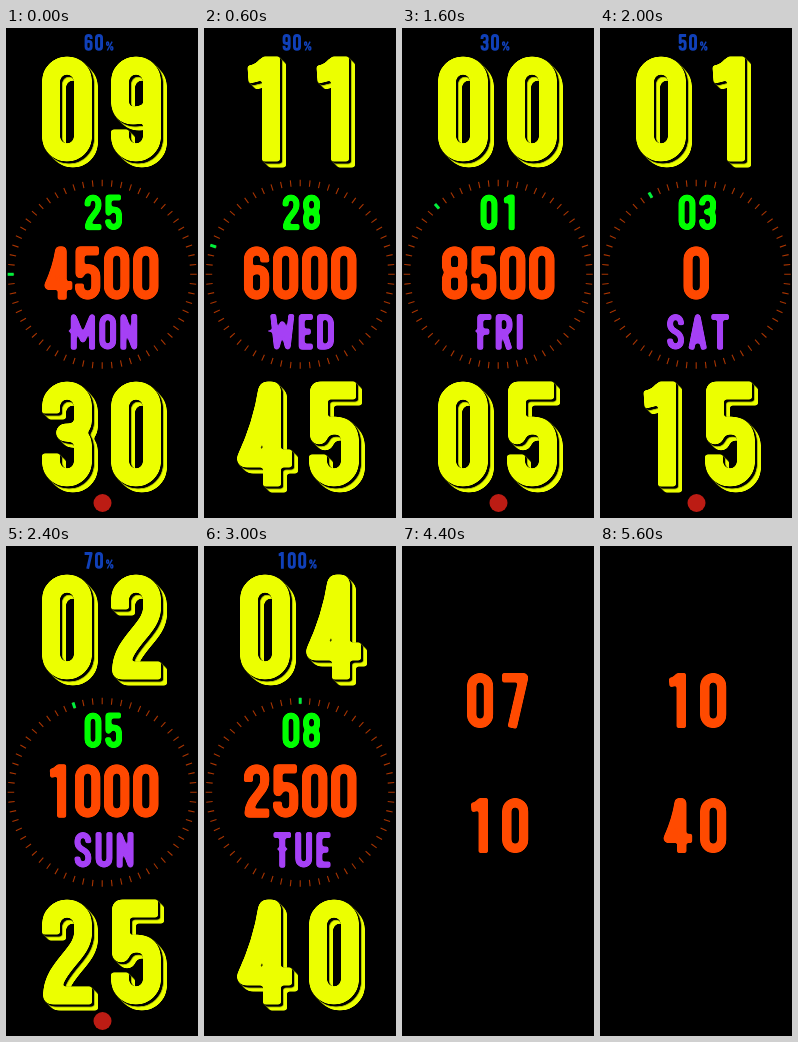
Write an HTML page that moves like this. It is 192 px wide and 490 px high and loops after 5800 ms.

```html
<!DOCTYPE html>
<html lang="en">
<head>
<meta charset="utf-8">
<title>Watch face</title>
<style>
  html, body { margin: 0; width: 100%; height: 100%; overflow: hidden; background: #000; }
  svg { display: block; width: 100vw; height: 100vh; }
</style>
</head>
<body>
<svg viewBox="0 0 192 490" role="img" fill="none" stroke-linejoin="round">
  <defs>
    <filter id="soften" filterUnits="userSpaceOnUse" x="0" y="0" width="192" height="490" color-interpolation-filters="sRGB">
      <feGaussianBlur stdDeviation="1.5"/>
      <feComponentTransfer><feFuncA type="linear" slope="6" intercept="-2.5"/></feComponentTransfer>
    </filter>
    <filter id="softenSmall" filterUnits="userSpaceOnUse" x="0" y="0" width="192" height="490" color-interpolation-filters="sRGB">
      <feGaussianBlur stdDeviation="0.8"/>
      <feComponentTransfer><feFuncA type="linear" slope="4" intercept="-1.5"/></feComponentTransfer>
    </filter>
    <g id="time" stroke="currentColor" filter="url(#soften)"><g id="hour"></g><g id="minute"></g></g>
  </defs>
  <rect width="192" height="490" fill="#000"/>
  <g id="active">
    <g id="ring" stroke="#a83400" stroke-width="1.1"></g>
    <path id="second" stroke="#00f03c" stroke-width="3"/>
    <g id="extrusion"></g>
    <g id="battery" stroke="#1040b8"></g>
    <g id="day" stroke="#00ff00" filter="url(#softenSmall)"></g>
    <g id="steps" stroke="#ff4800" filter="url(#softenSmall)"></g>
    <g id="weekday" stroke="#a540f5" filter="url(#softenSmall)"></g>
    <circle id="link" cx="96.5" cy="475" r="9" fill="#bc1c14"/>
  </g>
  <g id="idle" stroke="#ff4a00" filter="url(#softenSmall)"><g id="idleHour"></g><g id="idleMinute"></g></g>
</svg>
<script>
const STEP = 200, STEPS = 29, IDLE_FROM = 22;
const CENTER = { x: 96.2, y: 246.3 };
const DAYS = ['SUN', 'MON', 'TUE', 'WED', 'THU', 'FRI', 'SAT'];

// Centre lines of 105-unit tall letters, drawn with an 18-unit pen.
const GLYPHS = {
  0: 'M9 25a16 16 0 0 1 32 0V80a16 16 0 0 1-32 0Z',
  1: 'M31 105V0M8 18Q22 17 28 6',
  2: 'M9 35V25a16 16 0 0 1 32 0V34C41 54 10 68 10 96H50',
  3: 'M9 32V25a16 16 0 0 1 32 0V38Q41 51 23 51Q41 51 41 65V80a16 16 0 0 1-32 0V72',
  4: 'M32 105V9H27Q22 42 6 77H52',
  5: 'M47 9H10V54Q14 44 25 44Q41 44 41 60V80a16 16 0 0 1-32 0V73',
  6: 'M41 32V25a16 16 0 0 0-32 0V80a16 16 0 0 0 32 0V61Q41 46 27 46Q18 46 9 52',
  7: 'M0 9H41L19 105',
  8: 'M9 25a16 16 0 0 1 32 0V37a15 15 0 0 1-32 0ZM9 66a15 15 0 0 1 32 0V80a16 16 0 0 1-32 0Z',
  9: 'M9 73V80a16 16 0 0 0 32 0V25a16 16 0 0 0-32 0V44Q9 59 23 59Q32 59 41 53',
  A: 'M9 105L28 9L47 105M15 78H41',
  D: 'M9 9H25a16 16 0 0 1 16 16V80a16 16 0 0 1-16 16H9Z',
  E: 'M42 9H9V96H42M9 52H36',
  F: 'M42 9H9V105M9 52H36',
  H: 'M9 0V105M41 0V105M9 52H41',
  I: 'M9 0V105',
  M: 'M9 105V9L36 75L63 9V105',
  N: 'M9 105V9L41 96V0',
  R: 'M9 105V9H25a16 16 0 0 1 16 16V38a16 16 0 0 1-16 16H9M25 54L41 105',
  S: 'M41 33V25a16 16 0 0 0-32 0V32Q9 44 25 52T41 74V80a16 16 0 0 1-32 0V72',
  T: 'M0 9H52M26 9V105',
  U: 'M9 0V80a16 16 0 0 0 32 0V0',
  W: 'M9 0L20 96L36 30L52 96L63 0'
};
GLYPHS.O = GLYPHS[0];
const WIDTHS = { A: 56, E: 42, F: 42, I: 18, M: 72, T: 52, W: 72 };
const widthOf = c => WIDTHS[c] || 50;

const $ = id => document.getElementById(id);
const pad = n => String(n).padStart(2, '0');

function lineWidth(text, gap) {
  return [...text].reduce((sum, c) => sum + widthOf(c) + gap, -gap);
}

function write(id, text, x, y, scale, gap, extra = '') {
  let pen = 0, marks = '';
  for (const c of text) {
    marks += `<path transform="translate(${pen})" d="${GLYPHS[c]}"/>`;
    pen += widthOf(c) + gap;
  }
  $(id).innerHTML =
    `<g transform="translate(${x} ${y}) scale(${scale})" stroke-width="18">${marks}${extra}</g>`;
}

function writeCentered(id, text, cx, y, scale, gap, extra) {
  write(id, text, cx - lineWidth(text, gap) * scale / 2, y, scale, gap, extra);
}

function radial(angle, inner, outer) {
  const a = angle * Math.PI / 180;
  const at = r => `${CENTER.x + r * Math.sin(a)} ${CENTER.y - r * Math.cos(a)}`;
  return `M${at(inner)}L${at(outer)}`;
}

function buildStatic() {
  let ticks = '';
  for (let i = 0; i < 60; i++) ticks += radial(i * 6, 88, 94.5);
  $('ring').innerHTML = `<path d="${ticks}"/>`;

  const copies = (color, reach) => {
    let out = '';
    for (let d = reach; d > 0; d -= 0.8)
      out += `<use href="#time" x="${d}" y="${d}" color="${color}"/>`;
    return out;
  };
  $('extrusion').innerHTML = copies('#ecff00', 6) + copies('#000', 2.2) +
    '<use href="#time" color="#ecff00"/>';
}

function writeBattery(percent) {
  const text = String(percent), scale = 0.16, gap = 15;
  const x = 93.5 - (text.length * 10.4 + 9) / 2;
  const sign = `<path transform="translate(${text.length * 65 + 2} 46)" stroke-width="9"
    d="M6 10a6 6 0 0 1 12 0V18a6 6 0 0 1-12 0ZM32 40a6 6 0 0 1 12 0V48a6 6 0 0 1-12 0ZM40 2L10 57"/>`;
  write('battery', text, x, 6, scale, gap, sign);
}

function draw(k) {
  const hour = pad(Math.floor(9.5 + k / 2) % 13);
  const minute = pad((6 + k) % 13 * 5);
  const idle = k >= IDLE_FROM;
  $('active').setAttribute('display', idle ? 'none' : 'inline');
  $('idle').setAttribute('display', idle ? 'inline' : 'none');
  document.querySelector('svg').setAttribute('aria-label', `${hour}:${minute}`);

  if (idle) {
    write('idleHour', hour, 65, 127, 0.524, 17);
    write('idleMinute', minute, 65, 252, 0.524, 17);
    return;
  }
  write('hour', hour, 36, 28.5, 1, 19);
  write('minute', minute, 36, 353.5, 1, 19);
  writeBattery((6 + k) % 11 * 10);
  write('day', pad((25 + k) % 32), 78.5, 166.5, 0.34, 10.5);
  writeCentered('steps', String((9 + k) % 19 * 500), 96.2, 218.2, 0.51, 7);

  const dayIndex = Math.floor(1.5 + k / 2) % 7, name = DAYS[dayIndex];
  const stem = name[0] === 'T' ? 26 : 9;
  const workday = dayIndex > 0 && dayIndex < 6;
  const bar = workday ? `<path d="M${stem - 17} 50h34" stroke-width="6"/>` : '';
  writeCentered('weekday', name, 98, 286, 0.34, 12, bar);

  $('second').setAttribute('d', radial((45 + k) % 61 * 6, 88.5, 94.5));
  $('link').setAttribute('display', k % 2 ? 'none' : 'inline');
}

buildStatic();
const start = performance.now();
let shown = -1;
function tick() {
  const k = Math.floor((performance.now() - start) / STEP) % STEPS;
  if (k !== shown) draw(shown = k);
  requestAnimationFrame(tick);
}
tick();
</script>
</body>
</html>
```
